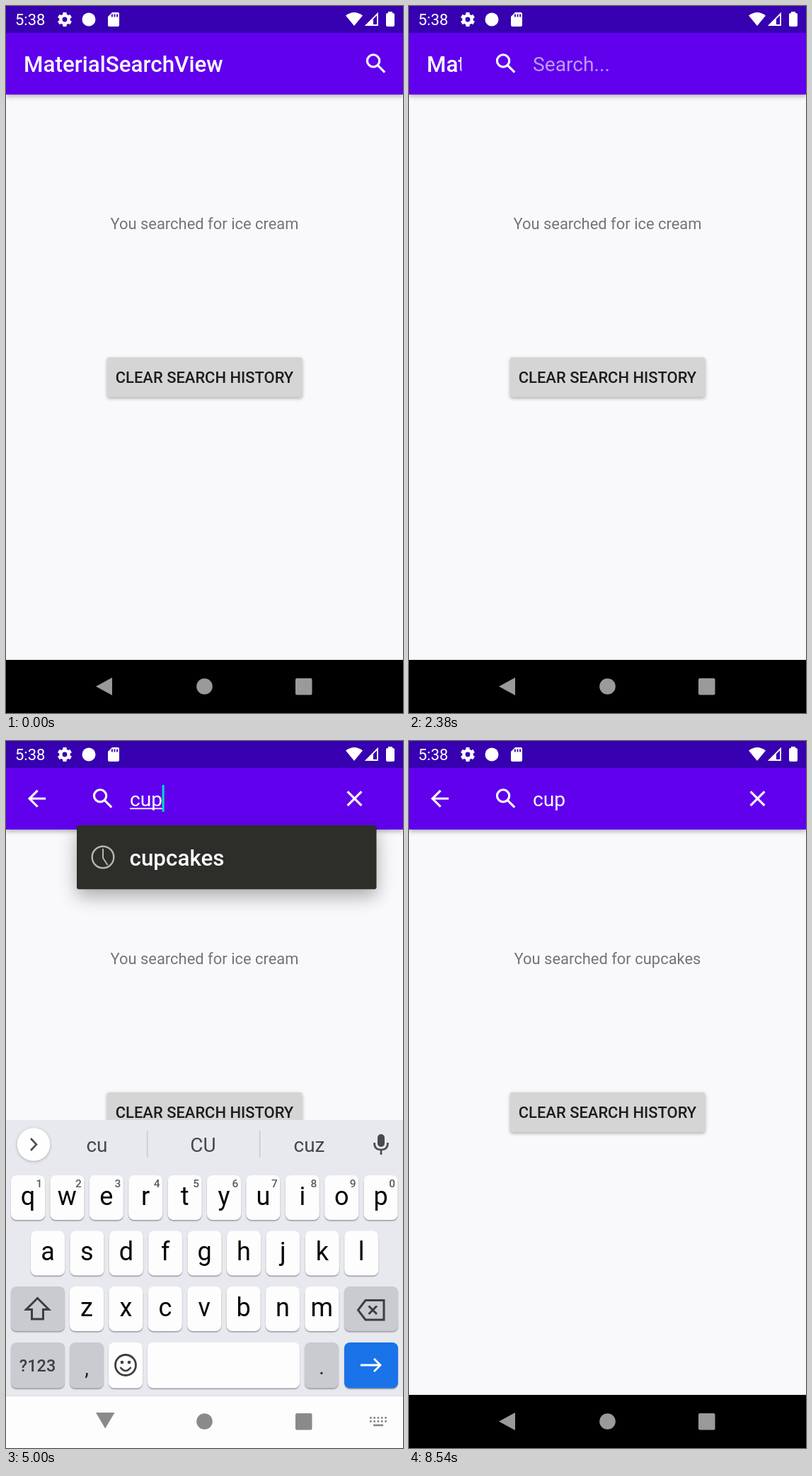
Write an HTML page with a canvas that moves like this. It is 561 px wide and 998 px high and loops after 8.75 s.

```html
<!DOCTYPE html>
<html lang="en">
<head>
<meta charset="utf-8">
<title>Search view demo</title>
<style>
html, body { margin: 0; width: 100%; height: 100%; overflow: hidden; background: #000; }
canvas { display: block; width: 561px; height: 998px; }
</style>
</head>
<body>
<canvas id="stage" width="561" height="998"></canvas>
<script>
const W = 561, H = 998, LOOP = 8750, DP = 1.568;
const screenCtx = document.getElementById('stage').getContext('2d');
const layerCanvas = document.createElement('canvas');
layerCanvas.width = W;
layerCanvas.height = H;
const layerCtx = layerCanvas.getContext('2d');
let g = screenCtx;

const TYPED = [[4120, 'c'], [4540, 'cu'], [4960, 'cup']];
const STRIPS = { c: ['c', 'C', 'can'], cu: ['cu', 'CU', 'cuz'], cup: ['cup', 'cups', 'cupcakes'] };
const HISTORY = ['ice cream', 'potatoes', 'cupcakes'];
const STRIP_DELAY = 80;

const SEARCH = 'M15 9.5A5.5 5.5 0 1 1 4 9.5A5.5 5.5 0 1 1 15 9.5M13.6 13.6L19.8 19.8';
const BACK = 'M5 12H20M12.7 4.7L5.4 12L12.7 19.3';
const CLOSE = 'M5.7 5.7L18.3 18.3M18.3 5.7L5.7 18.3';

const clamp = v => Math.max(0, Math.min(1, v));
const span = (t, from, to) => clamp((t - from) / (to - from));
const easeOut = p => 1 - (1 - p) ** 2;

function rect(x, y, w, h, color, r = 0) {
  g.fillStyle = color;
  g.beginPath();
  g.roundRect(x, y, w, h, r);
  g.fill();
}

function disc(x, y, r, color) {
  g.fillStyle = color;
  g.beginPath();
  g.arc(x, y, r, 0, Math.PI * 2);
  g.fill();
}

function ring(x, y, r, color, width) {
  g.strokeStyle = color;
  g.lineWidth = width;
  g.beginPath();
  g.arc(x, y, r, 0, Math.PI * 2);
  g.stroke();
}

function text(str, x, y, size, color, weight = 400, align = 'left') {
  g.font = `${weight} ${size}px Roboto, sans-serif`;
  g.textAlign = align;
  g.fillStyle = color;
  g.fillText(str, x, y);
}

function fill(d, color) {
  g.fillStyle = color;
  g.fill(new Path2D(d));
}

function stroke(d, color, width) {
  g.strokeStyle = color;
  g.lineWidth = width;
  g.stroke(new Path2D(d));
}

// Strokes a path given on a 24-unit icon grid, centred on x, y.
function icon(d, x, y, color, width = 2) {
  g.save();
  g.translate(x - 12 * DP, y - 12 * DP);
  g.scale(DP, DP);
  stroke(d, color, width);
  g.restore();
}

function shadowed(blur, offset, alpha, draw) {
  g.save();
  g.shadowBlur = blur;
  g.shadowOffsetY = offset;
  g.shadowColor = `rgba(0,0,0,${alpha})`;
  draw();
  g.restore();
}

// Paints a group with one common opacity.
function group(alpha, draw) {
  if (alpha >= 1) return draw();
  layerCtx.clearRect(0, 0, W, H);
  g = layerCtx;
  draw();
  g = screenCtx;
  g.save();
  g.globalAlpha = alpha;
  g.drawImage(layerCanvas, 0, 0);
  g.restore();
}

function statusBar() {
  rect(0, 0, W, 38, '#3700b0');
  text('5:38', 13, 27, 21.95, '#fff');
  ring(83, 19, 5.6, '#fff', 4.4);
  for (let i = 0; i < 6; i++) {
    g.save();
    g.translate(83, 19);
    g.rotate(i * Math.PI / 3);
    rect(-2.6, -10, 5.2, 4, '#fff', 0.5);
    g.restore();
  }
  disc(117, 19, 9.5, '#fff');
  fill('M150 9H158Q160 9 160 11V27Q160 29 158 29H146Q144 29 144 27V15Z', '#fff');
  for (const x of [149, 152.6, 156.2]) rect(x, 11.5, 1.8, 4, '#3700b0');
  fill('M480 13.5Q492 4.5 504 13.5L492 28Z', '#fff');
  stroke('M525 11V27H509Z', '#fff', 1.8);
  fill('M519 17V27H509Z', '#fff');
  rect(540, 8, 6, 4, '#fff');
  rect(537, 10, 12, 19, '#fff', 2);
}

function searchBar(t, query) {
  const white = '#fff';
  icon(BACK, 43.5, 81.3, white);
  icon(SEARCH, 137, 81.3, white);
  text(query || 'Search...', 175, 92, 28.2, query ? white : 'rgba(255,255,255,.6)');
  const end = query ? 175 + g.measureText(query).width : 175;
  if (query) icon(CLOSE, 492.5, 81.3, white);
  if (t >= 6410) return;
  if (query) rect(175, 94.5, end - 175, 1.8, white);
  const lastInput = TYPED.reduce((last, [at]) => t >= at ? at : last, 2600);
  if (t >= 2600 && (t - lastInput) % 1000 < 500) rect(end - 0.5, 62, 3, 38, '#03dac5');
}

function appBar(t, query) {
  shadowed(7, 2, 0.35, () => rect(0, 38, W, 87, '#6000ed'));
  const reveal = easeOut(span(t, 2210, 2500));
  if (reveal < 1) {
    text('MaterialSearchView', 25, 93, 31.36, '#fff', 500);
    icon(SEARCH, 523, 81.3, '#fff');
  }
  if (reveal > 0) {
    g.save();
    g.beginPath();
    g.rect(0, 38, W, 87);
    g.clip();
    g.beginPath();
    g.arc(523, 81, reveal * 540, 0, Math.PI * 2);
    g.clip();
    rect(0, 38, W, 87, '#6000ed');
    searchBar(t, query);
    g.restore();
  }
}

function content(t) {
  rect(0, 125, W, 798, '#f9f9fc');
  text('You searched for ' + (t < 6050 ? 'ice cream' : 'cupcakes'), 280.5, 314.5, 21.95, '#757575', 400, 'center');
  shadowed(5, 2, 0.3, () => rect(143, 496, 275.5, 56, '#d5d5d6', 3));
  text('CLEAR SEARCH HISTORY', 280.5, 532, 21.95, '#1c1c1e', 500, 'center');
}

function dropdown(t, query) {
  const shown = t < 6060 ? span(t, 2450, 2600) : 1 - span(t, 6060, 6215);
  if (!shown) return;
  const items = HISTORY.filter(word => word.startsWith(query));
  const height = items.length * 90.3;
  group(shown, () => {
    const scale = 0.88 + 0.12 * shown;
    g.save();
    g.translate(263, 63);
    g.scale(scale, scale);
    g.translate(-263, -63);
    shadowed(26, 10, 0.32, () => rect(100, 119, 423.5, height, '#2d2d2a', 3));
    if (t > 5970) {
      g.save();
      g.beginPath();
      g.rect(100, 119, 423.5, height);
      g.clip();
      disc(313, 166, (t - 5970) * 0.8875, 'rgba(255,255,255,.1)');
      g.restore();
    }
    items.forEach((word, i) => {
      const y = 164 + i * 90.3;
      ring(137, y, 15.3, '#b5b5b3', 2.4);
      stroke(`M137 ${y - 12}V${y + 1}L143.5 ${y + 11}`, '#b5b5b3', 2);
      text(word, 174.5, y + 11.5, 31.36, '#fff', 500);
    });
    g.restore();
  });
}

function key(x, y, w, color = '#fdfdfd', h = 63) {
  shadowed(1.5, 1.5, 0.35, () => rect(x, y, w, h, color, 8));
}

function letters(row, x, y, hints) {
  [...row].forEach((letter, i) => {
    const left = x + i * 55.4;
    key(left, y, 48);
    text(letter, left + 24, y + 41.5, 36, '#050505', 400, 'center');
    if (hints) text((i + 1) % 10, left + 40, y + 17, 15.5, '#5a5a5a', 500, 'center');
  });
}

function microphone() {
  const gray = '#47494c';
  rect(525, 555, 10, 18, gray, 5);
  stroke('M520.5 567Q520.5 577 530 577Q539.5 577 539.5 567M530 577V584', gray, 2.6);
}

function toolStrip() {
  const gray = '#5a5c60';
  icon(SEARCH, 112, 569.5, gray);
  stroke('M181 558.5H200Q202.5 558.5 202.5 561V573L194.5 581H181Q178.5 581 178.5 578.5V561Q178.5 558.5 181 558.5ZM202 573H194.5V581M184.5 571Q188 576 193 573', gray, 2.6);
  disc(186, 566, 2, gray);
  disc(195, 566, 2, gray);
  text('GIF', 269, 576.5, 21, gray, 900, 'center');
  stroke('M338.5 559H360.5V582.5H338.5ZM343 567H356M343 572H356M343 577H352', gray, 2.6);
  rect(343.5, 557, 12, 5, gray);
  disc(349.5, 557, 3, gray);
  rect(399, 552, 1.5, 34, '#c9cbd0');
  for (const x of [439.5, 450, 460.5]) disc(x, 569.5, 3.2, gray);
}

function wordStrip(words) {
  words.forEach((word, i) => text(word, 128.5 + i * 150, 580, 28, '#46484b', 400, 'center'));
  for (const x of [199, 358]) rect(x, 550, 1.3, 38, '#c4c6cb');
}

function keyboardPanel(strip) {
  const dark = '#3c3e42', special = '#c9cbd0';
  rect(0, 535, W, 390, '#e7e9ee');
  shadowed(4, 1, 0.25, () => disc(39, 569.5, 23.3, '#fefefe'));
  stroke(strip ? 'M35 561L43 569.5L35 578' : 'M43 561L35 569.5L43 578', '#4c4e52', 2.6);
  if (strip) wordStrip(strip); else toolStrip();
  microphone();

  letters('qwertyuiop', 7, 613, true);
  letters('asdfghjkl', 35, 691.5);
  letters('zxcvbnm', 90, 770);

  key(7, 770, 76, special);
  stroke('M44.5 786.5L60.5 802.5H52.5V816H36.5V802.5H28.5Z', dark, 3);
  key(478, 770, 76, special);
  stroke('M508 789.5H534V817H508L497.5 803.3ZM512.5 797.5L524 809M524 797.5L512.5 809', dark, 3);

  key(7, 849, 76, special, 64.5);
  text('?123', 44.5, 889.5, 23.5, dark, 500, 'center');
  key(90, 849, 48, special, 64.5);
  text(',', 114, 895, 29, '#222', 400, 'center');
  key(145, 849, 48, '#fdfdfd', 64.5);
  ring(169, 881, 14.5, dark, 2.8);
  disc(164, 877, 2.3, dark);
  disc(174, 877, 2.3, dark);
  stroke('M161.5 884Q169 894 176.5 884', dark, 2.6);
  key(200, 849, 215, '#fdfdfd', 64.5);
  key(422, 849, 48, special, 64.5);
  text('.', 446, 894, 29, '#222', 400, 'center');
  key(478, 849, 76, '#1a73e8', 64.5);
  stroke('M501 881H529M520 872L529 881L520 890', '#fff', 2.8);

  rect(0, 924, W, 80, '#fdfdfd');
  rect(0, 924, W, 1, '#dddddf');
}

function navIcons(keyboardUp, showSwitcher) {
  const gray = keyboardUp ? '#8a8a8a' : '#9a9a9a';
  fill(keyboardUp ? 'M127 948H153.5L140.2 970.5Z' : 'M127 960.5L150 948V973Z', gray);
  disc(280.5, 960.5, 11.3, gray);
  rect(409, 949, 23.5, 23.5, gray, 2);
  if (!showSwitcher) return;
  for (let i = 0; i < 10; i++) rect(514 + (i % 5) * 5.3, i < 5 ? 954 : 959, 2.7, 2.7, gray);
  rect(519, 964.5, 14, 2.7, gray);
}

function keyboard(t) {
  const up = t < 6000 ? easeOut(span(t, 2560, 2810)) : 1 - span(t, 6190, 6410) ** 1.5;
  const stripFor = TYPED.reduce((word, [at, typed]) => t >= at + STRIP_DELAY ? typed : word, '');
  rect(0, 923, W, 75, '#000');
  if (up > 0) {
    group(up, () => {
      g.save();
      g.translate(0, (1 - up) * 463);
      keyboardPanel(STRIPS[stripFor]);
      g.restore();
    });
  }
  if (up === 0 || up === 1) navIcons(up === 1, up === 1 && t < 6090);
}

function render(t) {
  const query = TYPED.reduce((word, [at, typed]) => t >= at ? typed : word, '');
  content(t);
  appBar(t, query);
  statusBar();
  dropdown(t, query);
  keyboard(t);
}

const start = performance.now();
function tick() {
  render((performance.now() - start) % LOOP);
  requestAnimationFrame(tick);
}
tick();
</script>
</body>
</html>
```
